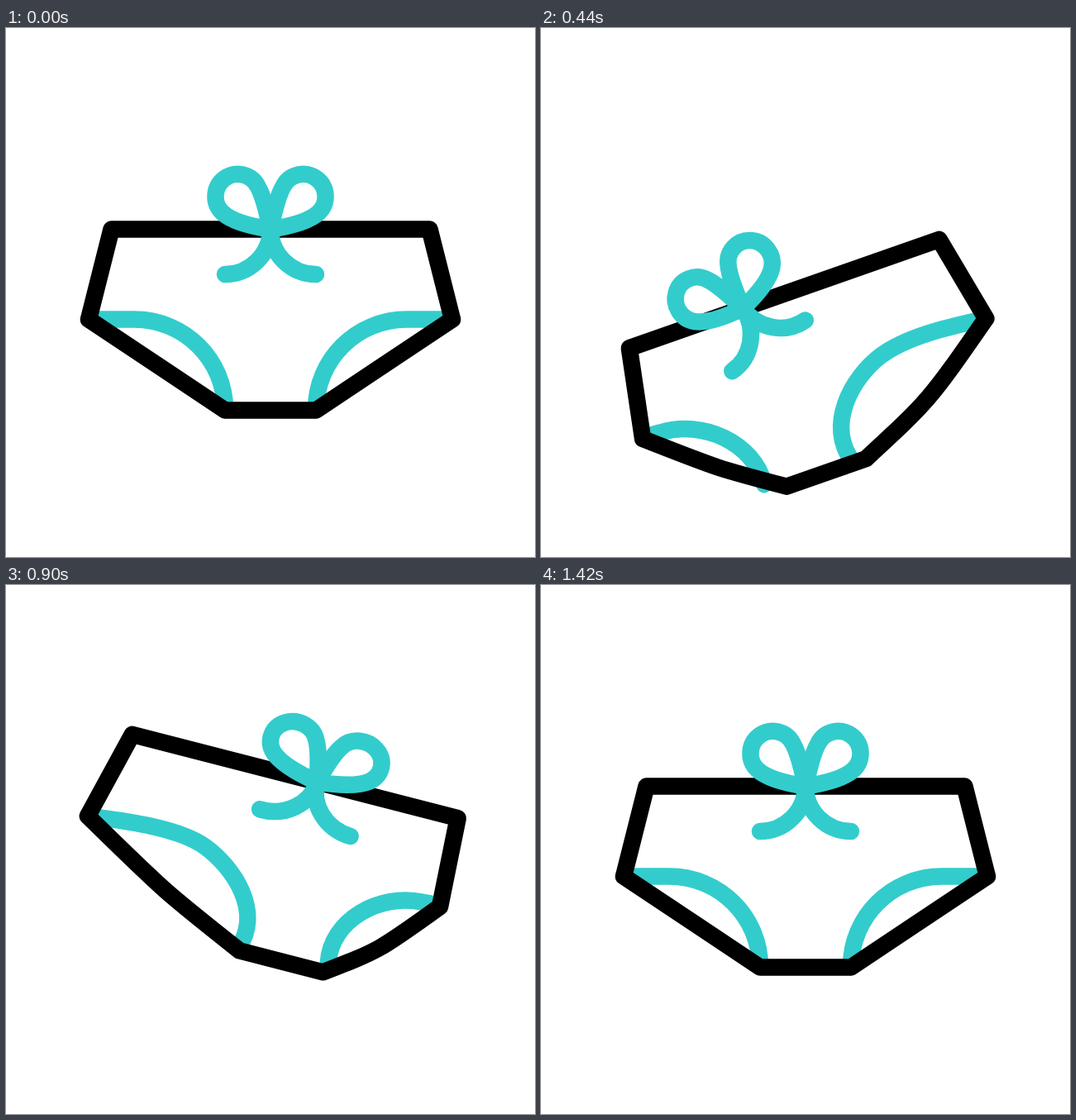
An HTML page with a canvas for the animation above (2400 ms loop, 640 by 640 pixels).

```html
<!DOCTYPE html>
<html>
<head>
<meta charset="utf-8">
<style>
  html, body { margin: 0; width: 100%; height: 100%; overflow: hidden; background: #fff; }
  canvas { display: block; }
</style>
</head>
<body>
<canvas id="stage" width="640" height="640"></canvas>
<script>
const ctx = document.getElementById('stage').getContext('2d');
const LOOP = 2400, STEP = 20, END = 1420;
const TEAL = '#33cccc', LINE = 20.5;

// Eased keys: [time, value]
const HEIGHT = [[0, 320], [360, 415.5], [720, 242], [1080, 363.7], [END, 320]];
const TILT = [[0, 0], [412, -19.8], [820, 16.5], [1180, 0], [END, 0]];

// Secondary motion: rest value, then the poses at the inner KNOTS
const KNOTS = [0, 300, 540, 680, 900, 1060, END];
const SHAPE = {
  waistL: [-192.5, -197, -199.2, -195.7, -192.4, -191.3],
  waistR: [192.5, 195.3, 201.4, 208.3, 214.4, 210.5],
  baseL: [-55, -74.8, -65.8, -34, -1.6, -13.2],
  baseR: [55, 30.2, 34.7, 69, 102.6, 92.7],
  bulgeL: [0, 3, 5, 6, 5, 3],
  bulgeR: [0, 7, 10, 9, 8, 9],
  legs: [0, -36, -38, 1, 51, 40],
  bowX: [0, -48, -45, -7.6, 38.7, 30.8],
  bowTilt: [0, -28.4, -28.5, 6.3, 16.6, 1],
  bowW: [1, 1.02, 0.95, 0.92, 1.04, 0.973],
  bowH: [1, 0.953, 1.05, 1.066, 0.943, 1.025]
};

const BOW = new Path2D([-1, 1].map(m =>
  `M0 0C${4 * m} -20 ${8 * m} -39 ${15.5 * m} -52` +
  `A27 27 0 1 ${m > 0 ? 1 : 0} ${58 * m} -20C${46 * m} -9 ${20 * m} -3 0 0` +
  `C0 30 ${25 * m} 54.5 ${55 * m} 54.5`).join(''));

const rad = deg => deg * Math.PI / 180;

function eased(keys, t) {
  let i = 0;
  while (i < keys.length - 2 && t > keys[i + 1][0]) i++;
  const [t0, a] = keys[i], [t1, b] = keys[i + 1];
  const s = (t - t0) / (t1 - t0);
  return a + (b - a) * s * s * (3 - 2 * s);
}

// Cubic spline through the knots, at rest at both ends
function spline(poses, t) {
  const v = [...poses, poses[0]], last = v.length - 1;
  let i = 0;
  while (i < last - 1 && t > KNOTS[i + 1]) i++;
  const gap = k => KNOTS[k + 1] - KNOTS[k];
  const rate = k => (v[k + 1] - v[k]) / gap(k);
  const slope = k => k === 0 || k === last ? 0 :
    (rate(k - 1) * gap(k) + rate(k) * gap(k - 1)) / (gap(k - 1) + gap(k));
  const h = gap(i), s = (t - KNOTS[i]) / h, r = 1 - s;
  return v[i] * r * r * (1 + 2 * s) + v[i + 1] * s * s * (3 - 2 * s) +
    h * s * r * (slope(i) * r - slope(i + 1) * s);
}

function stroke(path, color) {
  ctx.strokeStyle = color;
  ctx.stroke(path);
}

// side: -1 left, 1 right; shift moves the opening sideways.
// A widened opening stretches freely, a narrowed one is held by the hip.
function leg(side, shift) {
  const d = side * shift, pull = Math.min(d, 0), push = Math.max(d, 0);
  const squeeze = Math.tanh(push / 30);
  const kneeX = 165 + 1.8 * pull + 36 * squeeze, kneeY = 109 - 0.01 * pull;
  const near = 1.37 * pull + 44 * squeeze;
  const outX = 104 + near, outY = 109 - 0.31 * pull + 2 * squeeze;
  const path = new Path2D();
  path.moveTo(220 * side, 109);
  path.bezierCurveTo((205 + 0.4 * pull) * side, 109 + 0.08 * pull,
    Math.min(2 * kneeX - outX, 215) * side, 2 * kneeY - outY, kneeX * side, kneeY);
  path.bezierCurveTo(outX * side, outY,
    (55 + near) * side, 158 - 0.2 * pull, (55 + d) * side, 218.5 - 0.2 * push);
  return path;
}

function body(p) {
  const path = new Path2D(), base = 219 + 2 * Math.min(1, p.bulgeR / 8);
  const bend = (x, side, bulge) => [
    220 * side + (x - 220 * side) * 0.54 + side * 0.73 * bulge,
    109 + (base - 109) * 0.54 + 1.1 * bulge
  ];
  const right = bend(p.baseR, 1, p.bulgeR), left = bend(p.baseL, -1, p.bulgeL);
  path.moveTo(p.waistL, 0);
  path.lineTo(p.waistR, 0);
  path.lineTo(220, 109);
  path.bezierCurveTo(...right, ...right, p.baseR, base);
  path.lineTo(p.baseL, base);
  path.bezierCurveTo(...left, ...left, -220, 109);
  path.closePath();
  return path;
}

function draw(t) {
  const p = {};
  for (const name in SHAPE) p[name] = spline(SHAPE[name], t);
  const tilt = eased(TILT, t);

  ctx.setTransform(1, 0, 0, 1, 0, 0);
  ctx.fillStyle = '#fff';
  ctx.fillRect(0, 0, 640, 640);
  ctx.lineWidth = LINE;
  ctx.lineCap = ctx.lineJoin = 'round';

  ctx.translate(320, eased(HEIGHT, t));
  ctx.rotate(rad(tilt));
  ctx.translate(0, -76.5);
  stroke(leg(-1, p.legs), TEAL);
  stroke(leg(1, p.legs), TEAL);
  stroke(body(p), '#000');

  ctx.translate(p.bowX, 0);
  ctx.rotate(rad(p.bowTilt - tilt));
  const bow = new Path2D();
  bow.addPath(BOW, new DOMMatrix([p.bowW, 0, 0, p.bowH, 0, 0]));
  stroke(bow, TEAL);
}

function tick() {
  const t = Math.floor(performance.now() % LOOP / STEP) * STEP;
  draw(Math.min(t, END));
  requestAnimationFrame(tick);
}
tick();
</script>
</body>
</html>
```
